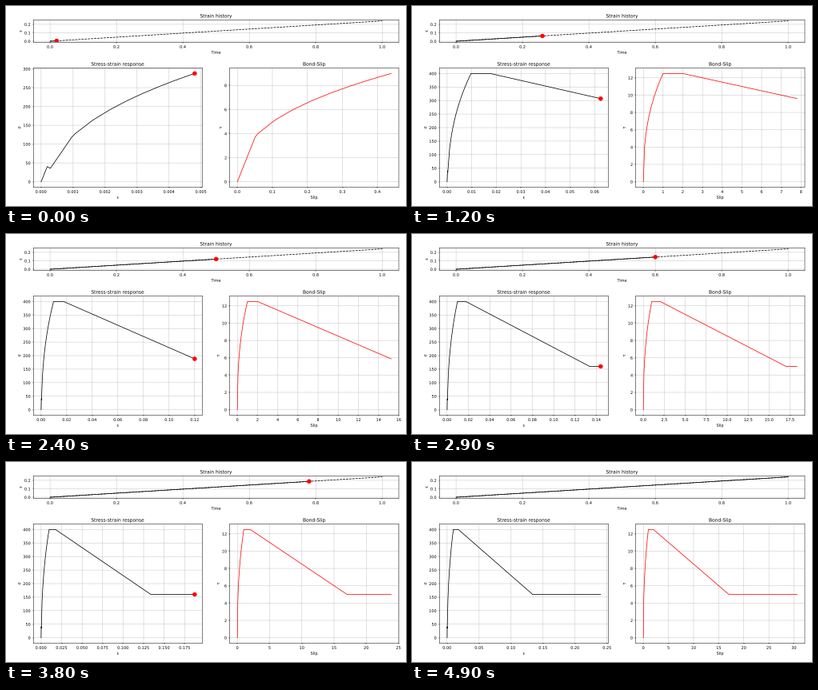
Animation of 500 by 250 pixels, one loop 5 s. Source, as a matplotlib script:

```python
import matplotlib.pyplot as plt
import numpy as np
from matplotlib import patheffects
from matplotlib.animation import FuncAnimation

WIDTH, HEIGHT = 500, 250
FRAMES, INTERVAL = 50, 100
STEPS_PER_FRAME = 50
MAX_STRAIN = 0.24

E_STEEL = 210000
BOND_LENGTH = 128      # slip per unit of strain beyond the elastic part
STRESS_PER_BOND = 32
CRACK_STRAIN = 0.0002

# Outlined text and unsnapped lines keep small details at subpixel positions.
plt.rcParams.update({
    "font.family": "DejaVu Sans",
    "font.size": 10,
    "axes.titlesize": 12,
    "axes.linewidth": 1.0,
    "path.snap": False,
    "path.effects": [patheffects.Normal()],
})


def bond_law():
    """Power-law rise, plateau, linear softening and residual friction."""
    rise = np.linspace(0, 1, 20)
    slip = np.append(rise, [2, 17, 40])
    bond = np.append(12.5 * rise ** 0.4, [12.5, 5, 5])
    return slip, bond


def pull_out_response(strain):
    slip, bond = bond_law()
    stress = STRESS_PER_BOND * bond
    total_strain = slip / BOND_LENGTH + stress / E_STEEL
    cracked = np.interp(strain, total_strain, stress)
    return (np.where(strain < CRACK_STRAIN, E_STEEL * strain, cracked),
            np.interp(strain, total_strain, slip),
            np.interp(strain, total_strain, bond))


time = np.linspace(0, 1, FRAMES * STEPS_PER_FRAME + 1)
strain = MAX_STRAIN * time
stress, slip, bond = pull_out_response(strain)

fig = plt.figure(figsize=(14, 7), dpi=WIDTH / 14)


def add_panel(left, top, right, bottom, title, xlabel, ylabel):
    ax = fig.add_axes([left / WIDTH, 1 - bottom / HEIGHT,
                       (right - left) / WIDTH, (bottom - top) / HEIGHT])
    ax.set(title=title, xlabel=xlabel, ylabel=ylabel)
    ax.grid(alpha=0.9)
    return ax


history_ax = add_panel(34.3, 17.4, 491, 45.3, "Strain history", "Time", "ε")
stress_ax = add_panel(34.3, 77.6, 245.4, 226.4,
                      "Stress-strain response", "ε", "σ")
bond_ax = add_panel(279.6, 77.6, 491, 226.4, "Bond-Slip", "Slip", "τ")

history_ax.plot([0, 1], [0, MAX_STRAIN], "k--", lw=1.5)
history_ax.set(xlim=(-0.05, 1.05),
               ylim=(-0.05 * MAX_STRAIN, 1.05 * MAX_STRAIN),
               yticks=[0, 0.1, 0.2])

history_line, = history_ax.plot([], [], "k", lw=1.5)
stress_line, = stress_ax.plot([], [], "k", lw=1.5)
bond_line, = bond_ax.plot([], [], "r", lw=1.5)
history_dot, = history_ax.plot([], [], "ro", ms=10)
stress_dot, = stress_ax.plot([], [], "ro", ms=10)


def fit_limits(ax, x, y, margin=0.05):
    ax.set_xlim(-margin * x.max(), (1 + margin) * x.max())
    ax.set_ylim(-margin * y.max(), (1 + margin) * y.max())


def update(frame):
    last = (frame + 1) * STEPS_PER_FRAME
    shown = slice(0, last + 1)
    history_line.set_data(time[shown], strain[shown])
    stress_line.set_data(strain[shown], stress[shown])
    bond_line.set_data(slip[shown], bond[shown])
    fit_limits(stress_ax, strain[shown], stress[shown])
    fit_limits(bond_ax, slip[shown], bond[shown])

    history_dot.set_data([time[last]], [strain[last]])
    stress_dot.set_data([strain[last]], [stress[last]])
    for dot in (history_dot, stress_dot):
        dot.set_visible(frame < FRAMES - 1)
    return history_line, stress_line, bond_line, history_dot, stress_dot


animation = FuncAnimation(fig, update, frames=FRAMES, interval=INTERVAL,
                          repeat=True, repeat_delay=0, blit=False)
plt.show()
```
